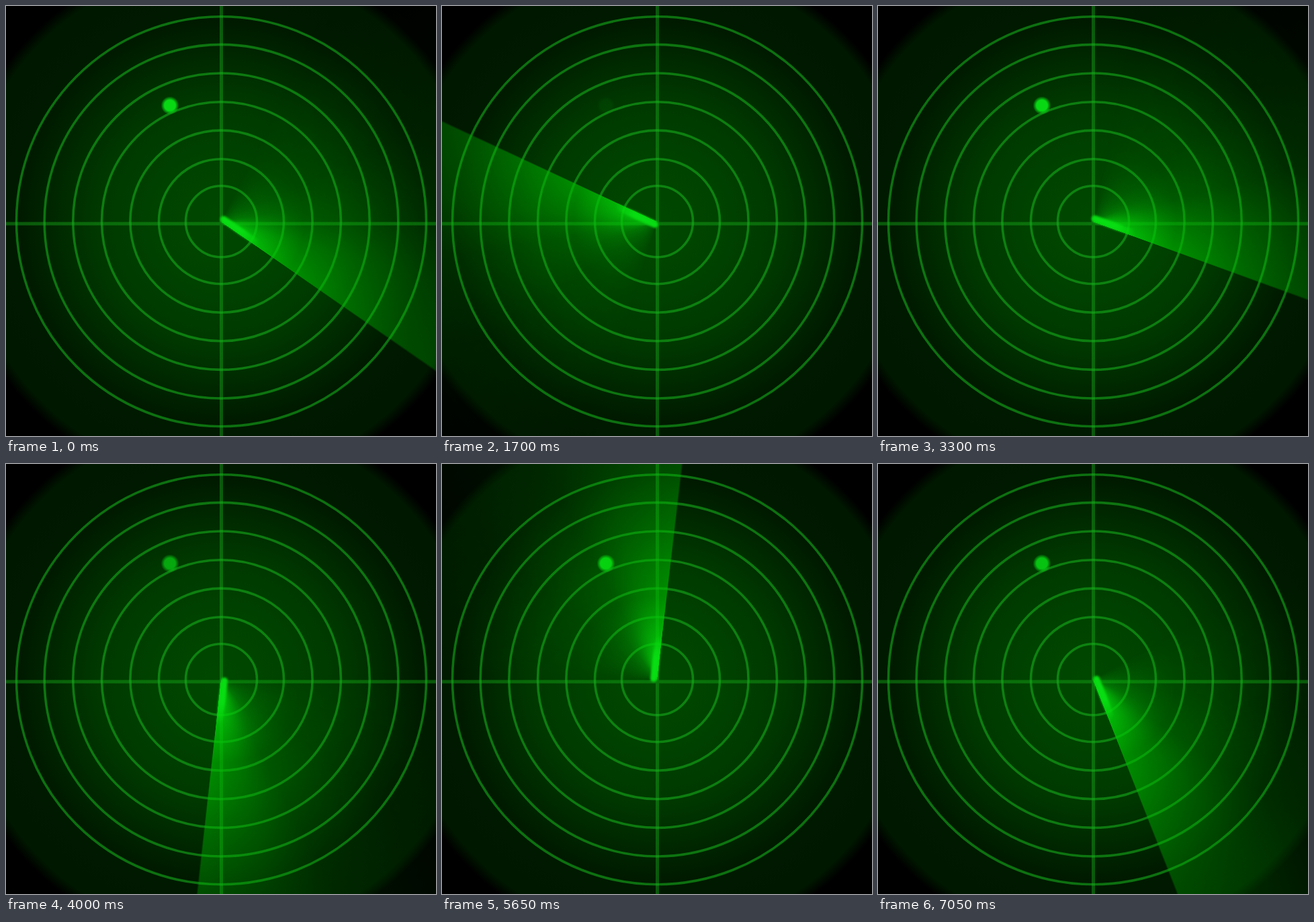
An HTML page that plays this animation: 640 by 640 pixels, repeating every 7.1 s.

```html
<!DOCTYPE html>
<html lang="en">
<head>
<meta charset="utf-8">
<title>Radar</title>
<style>
html, body { margin: 0; width: 100%; height: 100%; overflow: hidden; background: #000; }
#stage {
  position: relative; width: 640px; height: 640px; overflow: hidden;
  background: radial-gradient(circle at 320px 321px,
    #004800 0, #004200 100px, #003800 185px, #002600 255px, #001a00 300px, #001700 378px, #000 396px);
}
#sweep, .trail, .core { position: absolute; width: 920px; height: 920px; }
#sweep { left: -140px; top: -139px; }
.trail {
  background: conic-gradient(transparent 260deg, rgb(0 190 0 / .08) 300deg, rgb(0 190 0 / .21) 325deg,
    rgb(0 190 0 / .42) 340deg, rgb(0 190 0 / .62) 359.5deg, transparent 360deg);
  mask-image: radial-gradient(circle, #000 130px, rgb(0 0 0 / .75) 210px, rgb(0 0 0 / .5) 330px, rgb(0 0 0 / .36) 460px);
}
.core {
  background: conic-gradient(transparent 260deg, rgb(5 210 12 / .25) 315deg,
    rgb(5 220 12 / .7) 345deg, rgb(5 220 12 / .85) 359.5deg, transparent 360deg);
  mask-image: radial-gradient(circle, #000 25px, rgb(0 0 0 / .6) 65px, transparent 125px);
}
.tip {
  position: absolute; left: 450px; top: 394px; width: 10px; height: 70px;
  border-radius: 10px 0 5px 5px; filter: blur(1.5px);
  background: linear-gradient(transparent, #08dc12 45%);
}
svg { position: absolute; left: 0; top: 0; }
</style>
</head>
<body>
<div id="stage">
  <svg width="640" height="640" fill="none" stroke="rgb(24 176 28)">
    <defs>
      <radialGradient id="glow">
        <stop offset=".6" stop-color="#08d814"/>
        <stop offset="1" stop-color="#08d814" stop-opacity="0"/>
      </radialGradient>
    </defs>
    <path d="M0 324H640M320.5 0V640" stroke-width="5" stroke-opacity=".42"/>
    <g id="rings" stroke-width="3.6" stroke-opacity=".58"></g>
    <circle id="blip" cx="244" cy="148" r="13.5" fill="url(#glow)" stroke="none"/>
  </svg>
  <div id="sweep"><div class="trail"></div><div class="core"></div><div class="tip"></div></div>
</div>
<script>
const LOOP = 7100, STEP = 50, BLIP_ANGLE = 246;
// [time in ms, sweep angle in degrees clockwise from the right]
const path = [[0, 35], [700, 102.5], [750, 102.5], [950, 121.3], [2400, 283.6],
  [3300, 380.2], [4700, 533], [5650, 636.9], [7050, 788.7]];
const get = id => document.getElementById(id);
const sweep = get('sweep'), blip = get('blip');

get('rings').innerHTML = [53, 93, 135.6, 178, 220.7, 263.3, 305]
  .map(r => `<circle cx="320.5" cy="320.7" r="${r}"/>`).join('');

function angleAt(t) {
  const i = path.findIndex(([end]) => end >= t);
  if (i === 0) return path[0][1];
  const [t0, a0] = path[i - 1], [t1, a1] = path[i];
  return a0 + (a1 - a0) * (t - t0) / (t1 - t0);
}

function draw(now) {
  const angle = angleAt(Math.floor(now % LOOP / STEP) * STEP);
  const behind = (angle - BLIP_ANGLE + 360) % 360;
  sweep.style.transform = `rotate(${angle + 90}deg)`;
  blip.setAttribute('opacity', Math.min(1, Math.max(0, (330 - behind) / 170)));
  requestAnimationFrame(draw);
}
draw(performance.now());
</script>
</body>
</html>
```
